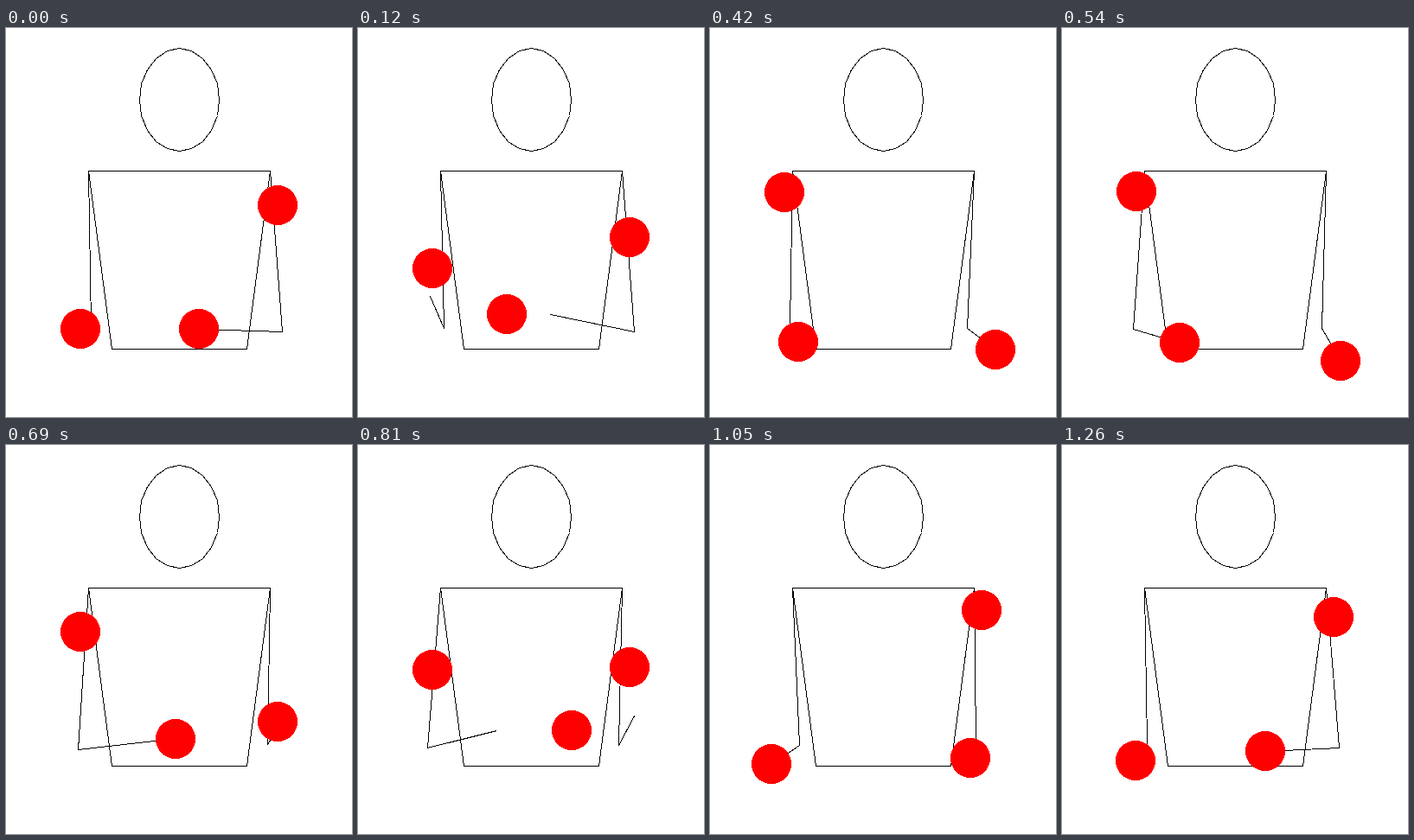
Recreate the animation shown at these times as an HTML page. Size 400x450 px, loop 1290 ms.

```html
<!DOCTYPE html>
<html lang="en">
<head>
<meta charset="utf-8">
<title>Box juggling</title>
<style>
  html, body { margin: 0; width: 100%; height: 100%; overflow: hidden; background: #fff; }
  svg { display: block; shape-rendering: crispEdges; }
  path { fill: none; stroke: #000; }
  circle { fill: #f00; }
</style>
</head>
<body>
<svg width="400" height="450" viewBox="0 0 400 450">
  <path id="body"/>
  <path id="arms"/>
  <circle r="23"/><circle r="23"/><circle r="23"/>
</svg>
<script>
// Lengths in cm (x right, z up from the hands' rest height); time in beats, four per loop.
const SCALE = 4.577, LOOP = 1290, STEP = 30;
const G = 15.64;                        // half of gravity, cm per beat squared
const SHOULDER = { x: 23, z: 40 }, REACH = 30, ARM = 41;

const px = p => [Math.round(200 + p.x * SCALE), Math.round(348.2 - p.z * SCALE)];
const line = points => "M" + points.map(p => px(p).map(v => v + 0.5)).join("L");
const mirror = p => ({ x: -p.x, z: p.z });

// Right hand: throw across, catch, throw straight up, catch.
const KNOTS = [
  { x: 5, vx: -30, vz: G },
  { x: 25, vx: 22.5, vz: -G },
  { x: 25, vx: 0, vz: 3 * G },
  { x: 25, vx: -7.5, vz: -G },
];

function rightHand(beat) {
  const i = Math.floor(beat) % 4, u = beat % 1;
  const a = KNOTS[i], b = KNOTS[(i + 1) % 4];
  const start = u * (1 - u) ** 2, end = u * u * (u - 1);
  return {
    x: a.x + (b.x - a.x) * u * u * (3 - 2 * u) + a.vx * start + b.vx * end,
    z: a.vz * start + b.vz * end,
  };
}
const leftHand = beat => mirror(rightHand(beat + 2));

function columnBall(beat) {
  const u = (beat + 2) % 4;
  return u < 3 ? { x: 25, z: G * u * (3 - u) } : rightHand(beat);
}

function crossBall(beat) {
  const u = beat % 2;
  const p = u < 1 ? { x: 5 - 30 * u, z: G * u * (1 - u) } : leftHand(u);
  return beat % 4 < 2 ? p : mirror(p);
}

// Two equal arm bones in space, elbow hanging down, seen from the front.
function rightElbow(hand) {
  const dx = hand.x - SHOULDER.x, dz = hand.z - SHOULDER.z;
  const flat = Math.hypot(dx, REACH), dist = Math.hypot(flat, dz);
  const drop = Math.sqrt(Math.max(0, ARM * ARM - dist * dist / 4));
  return {
    x: SHOULDER.x + dx * (0.5 + drop * dz / (flat * dist)),
    z: SHOULDER.z + dz / 2 - drop * flat / dist,
  };
}
const rightArm = hand => [SHOULDER, rightElbow(hand), hand];

const waist = { x: 17, z: -5 };
const head = Array.from({ length: 20 }, (_, i) => {
  const a = i * Math.PI / 10;
  return { x: 10 * Math.cos(a), z: 58 + 13 * Math.sin(a) };
});
document.getElementById("body").setAttribute("d",
  line([mirror(SHOULDER), SHOULDER, waist, mirror(waist)]) + "Z" + line(head) + "Z");

const arms = document.getElementById("arms");
const balls = document.querySelectorAll("circle");

function draw(now) {
  const beat = Math.floor(now % LOOP / STEP) * STEP / LOOP * 4;
  arms.setAttribute("d", line(rightArm(rightHand(beat))) +
    line(rightArm(rightHand(beat + 2)).map(mirror)));
  [columnBall(beat), mirror(columnBall(beat + 2)), crossBall(beat)].forEach((p, i) => {
    const [x, y] = px(p);
    balls[i].setAttribute("cx", x);
    balls[i].setAttribute("cy", y);
  });
}

let begin;
function tick(now) {
  begin ??= now;
  draw(now - begin);
  requestAnimationFrame(tick);
}
draw(0);
requestAnimationFrame(tick);
</script>
</body>
</html>
```
